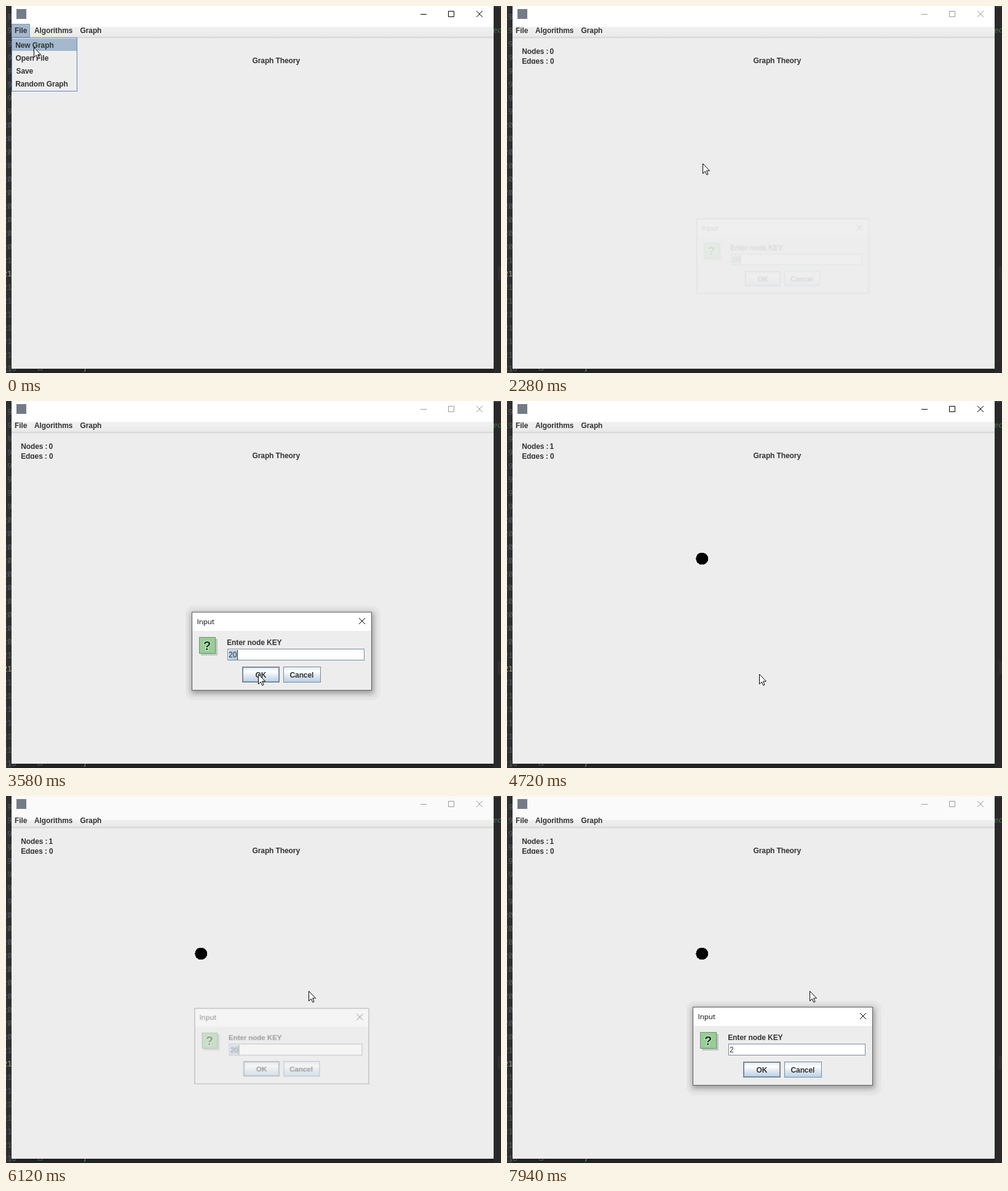
These frames come from a looping animation (805x597 px, 8 s). An HTML page:

```html
<!DOCTYPE html>
<html lang="en">
<head>
<meta charset="utf-8">
<title>Graph Theory</title>
<style>
html, body { margin: 0; width: 100%; height: 100%; overflow: hidden; background: #2b2b2b; }
svg { display: block; width: 805px; height: 597px; }
text { font: bold 12px "Liberation Sans", Arial, sans-serif; letter-spacing: -.1px; fill: #333; white-space: pre; }
rect, line, .node { shape-rendering: crispEdges; }
.code text { font: 12px "Noto Sans Mono", monospace; letter-spacing: 0; fill: #5c5f62; }
.code .now { fill: #b8a68c; }
.code .doc { font-style: italic; fill: #4a7a48; }
.value { font-weight: normal; letter-spacing: 0; }
.caption { font: 11.5px "Open Sans", sans-serif; letter-spacing: 0; fill: #000; }
.control { fill: url(#steel); stroke: #7a8a99; }

/* All states switch hard; 1% = 80 ms */
.k { animation: 8s step-end infinite; }
#cursor { animation-name: cursor; }
#menu { animation-name: menu; }
#stats { animation-name: stats; }
#zero { animation-name: zero; }
#one, #node { animation-name: one; }
#buttons { animation-name: buttons; }
#tint { animation-name: tint; }
#halo { animation-name: halo; }
#dialog { animation-name: dialog; transform-origin: 448px 407px; }
#selection { animation-name: selection; }
#full { animation-name: full; }
#typed { animation-name: typed; }
#caret { animation-name: caret; }
#pressed { animation-name: pressed; }

@keyframes cursor {
  0% { transform: translate(45px, 67px); }
  1.5% { transform: translate(46px, 67px); }
  3.375% { transform: translate(46px, 68px); }
  7.375% { transform: translate(47px, 68px); }
  9.375% { transform: translate(50px, 67px); }
  11.875% { transform: translate(53px, 66px); }
  14.25% { transform: translate(54px, 66px); }
  16.125% { transform: translate(120px, 108px); }
  17.75% { transform: translate(250px, 190px); }
  19.5% { transform: translate(329px, 241px); }
  21.375% { transform: translate(321px, 252px); }
  23.25% { transform: translate(318px, 256px); }
  33.5% { transform: translate(330px, 278px); }
  35% { transform: translate(362px, 340px); }
  36.5% { transform: translate(399px, 412px); }
  38% { transform: translate(412px, 437px); }
  41.5% { transform: translate(411px, 442px); }
  44.75% { transform: translate(410px, 444px); }
  62.875% { transform: translate(404px, 432px); }
  64.625% { transform: translate(387px, 400px); }
  66.375% { transform: translate(381px, 362px); }
  68% { transform: translate(422px, 328px); }
  69.75% { transform: translate(474px, 315px); }
  71.5%, 100% { transform: translate(492px, 317px); }
}
@keyframes menu { 0% { opacity: 1; } 7.375%, 100% { opacity: 0; } }
@keyframes stats { 0% { opacity: 0; } 7.375%, 100% { opacity: 1; } }
@keyframes zero { 0% { opacity: 1; } 59%, 100% { opacity: 0; } }
@keyframes one { 0% { opacity: 0; } 59%, 100% { opacity: 1; } }
@keyframes buttons {
  0%, 59% { stroke: #000; }
  28.5%, 76.5%, 100% { stroke: #999; }
}
@keyframes tint { 0% { opacity: 0; } 76.5%, 100% { opacity: 1; } }
@keyframes halo {
  0%, 59% { opacity: 0; }
  31.875%, 80%, 100% { opacity: 1; }
}
@keyframes dialog {
  0%, 59% { opacity: 0; transform: scale(.95); }
  28.5% { opacity: .11; transform: scale(.957); }
  30.125% { opacity: .75; transform: scale(.985); }
  76.5% { opacity: .45; transform: scale(.97); }
  78% { opacity: .85; transform: scale(.99); }
  31.875%, 80%, 100% { opacity: 1; transform: none; }
}
@keyframes selection {
  0%, 59% { opacity: 1; }
  53.625%, 94%, 100% { opacity: 0; }
}
@keyframes full { 0% { opacity: 1; } 94%, 100% { opacity: 0; } }
@keyframes typed { 0% { opacity: 0; } 94%, 100% { opacity: 1; } }
@keyframes caret {
  0%, 41.5%, 59%, 90.375% { opacity: 1; transform: none; }
  35%, 48.375%, 53.625%, 82.625% { opacity: 0; transform: none; }
  94% { opacity: 1; transform: translateX(-7px); }
  99.25%, 100% { opacity: 0; transform: translateX(-7px); }
}
@keyframes pressed {
  0%, 55.5%, 100% { opacity: 0; }
  53.625% { opacity: 1; }
}
</style>
</head>
<body>
<svg viewBox="0 0 805 597">
  <defs>
    <linearGradient id="steel" x2="0" y2="1">
      <stop stop-color="#dde8f3"/>
      <stop offset=".3" stop-color="#fff"/>
      <stop offset=".6" stop-color="#dde8f3"/>
      <stop offset="1" stop-color="#b8cfe5"/>
    </linearGradient>
    <linearGradient id="bar" x2="0" y2="1">
      <stop stop-color="#f1f1f1"/>
      <stop offset="1" stop-color="#ebebeb"/>
    </linearGradient>
    <filter id="blur" x="-10%" y="-20%" width="120%" height="140%"><feGaussianBlur stdDeviation="4"/></filter>
    <clipPath id="cut"><rect x="9" y="52" width="200" height="42"/></clipPath>
  </defs>

  <!-- Editor behind the window -->
  <rect width="805" height="597" fill="#292929"/>
  <rect width="9" height="597" fill="#2d2f31"/>
  <rect x="800" y="423" width="5" height="22" fill="#323232"/>
  <rect x="793" width="12" height="2" fill="#3a3c3e"/>
  <rect x="9" y="590" width="784" height="7" fill="#232323"/>
  <g class="code" id="code">
    <text class="doc" x="791" y="43">ec</text>
    <text x="125" y="593" style="fill:#8a9199">}</text>
    <rect x="52.5" y="586.5" width="6" height="6" fill="none" stroke="#55585a"/>
  </g>

  <!-- Main window -->
  <rect x="9" width="784" height="590" fill="#ededed"/>
  <rect x="9" width="784" height="34" fill="#fff"/>
  <rect x="9" y="34" width="784" height="15" fill="url(#bar)"/>
  <rect class="k" id="tint" x="9" width="784" height="39" fill="#fafafa"/>
  <rect x="9" y="49" width="784" height="1" fill="#dcdcdc"/>
  <rect x="9" y="51" width="784" height="1" fill="#c8c8c8"/>
  <rect x="17" y="5" width="16" height="16" fill="#737c86"/>
  <g class="k" id="buttons" fill="none">
    <path d="M674 13.5h10M719.5 8.5h9v9h-9zM765 8l10 10M775 8l-10 10"/>
  </g>
  <g class="k" id="menu">
    <rect x="9.5" y="29.5" width="29" height="21" fill="#a3b8cc" stroke="#8b9caf"/>
    <rect x="9.5" y="51.5" width="106" height="87" fill="#eee" stroke="#6382bf"/>
    <rect x="10" y="53" width="105" height="20" fill="#a3b8cc"/>
    <text x="15.2" y="68">New Graph</text>
    <text x="15.5" y="89">Open File</text>
    <text x="16.5" y="110">Save</text>
    <text x="15.2" y="131">Random Graph</text>
  </g>
  <text x="14" y="44">File</text>
  <text x="46" y="44">Algorithms</text>
  <text x="120.5" y="44">Graph</text>
  <text x="400.5" y="93">Graph Theory</text>
  <g class="k" id="stats" clip-path="url(#cut)">
    <text x="24.2" y="78">Nodes : </text>
    <text class="k" id="zero" x="69.5" y="78">0</text>
    <text class="k" id="one" x="69.5" y="78">1</text>
    <text x="24.2" y="94">Edges : 0</text>
  </g>
  <circle class="k node" id="node" cx="317.2" cy="256.5" r="10"/>

  <!-- Input dialog -->
  <g class="k" id="halo">
    <rect x="292" y="333" width="317" height="154" rx="14" fill="#e6e6e6"/>
    <rect x="301" y="344" width="297" height="132" opacity=".32" filter="url(#blur)"/>
  </g>
  <g class="k" id="dialog">
    <rect x="302.5" y="343.5" width="292" height="127" fill="#ededed" stroke="#5f5f5f"/>
    <rect x="303" y="344" width="291" height="30" fill="#fff"/>
    <text class="caption" x="310.5" y="363">Input</text>
    <path d="M574 353l10 10M584 353l-10 10" stroke="#000"/>
    <rect x="317" y="387" width="27" height="27" fill="#c4c4c4"/>
    <rect x="314.5" y="384.5" width="26" height="26" fill="#9c9" stroke="#696"/>
    <text x="321" y="405" style="font-size:20px;fill:#030;stroke:#e4f3e4;stroke-width:2px;paint-order:stroke">?</text>
    <text x="359.2" y="397">Enter node KEY</text>
    <rect x="360.5" y="403.5" width="222" height="18" fill="#fff" stroke="#7a8a99"/>
    <rect class="k" id="selection" x="362" y="405" width="14" height="16" fill="#b8cfe5"/>
    <text class="k value" id="full" x="362" y="417">20</text>
    <text class="k value" id="typed" x="362" y="417">2</text>
    <rect class="k" id="caret" x="376" y="405" width="1" height="16" fill="#333"/>
    <rect class="control" x="385" y="433" width="59" height="24" stroke-width="2"/>
    <rect class="k" id="pressed" x="386" y="434" width="57" height="22" fill="#b8cfe5"/>
    <text x="405.5" y="450">OK</text>
    <rect class="control" x="451.5" y="432.5" width="60" height="25"/>
    <text x="461.5" y="450">Cancel</text>
  </g>

  <g class="k" id="cursor">
    <path d="M.5 .5V16.5L4.2 13L6.8 18.6L9 17.6L6.6 12H11.5Z" fill="#fff" stroke="#000"/>
  </g>
</svg>
<script>
// Gutter numbers, mostly covered by the window
const code = document.getElementById("code");
for (let n = 192; n <= 218; n++) {
  const label = document.createElementNS("http://www.w3.org/2000/svg", "text");
  label.setAttribute("x", -5);
  label.setAttribute("y", 21.5 + (n - 192) * 22);
  if (n === 211) label.setAttribute("class", "now");
  label.textContent = n;
  code.append(label);
}
</script>
</body>
</html>
```
